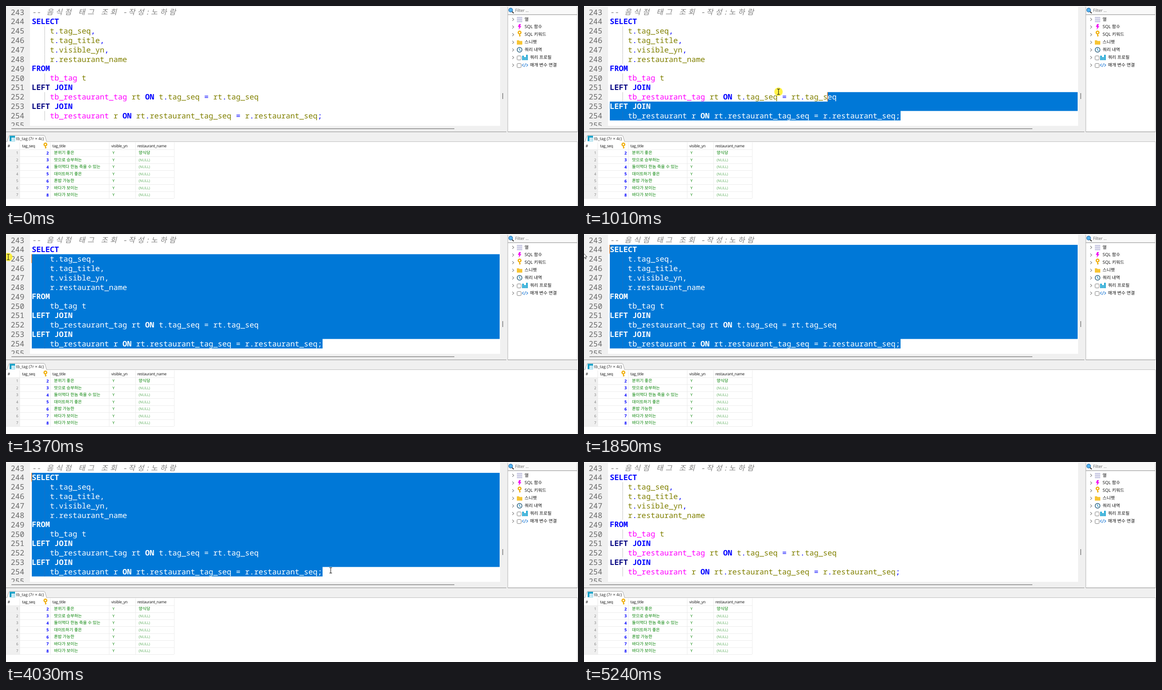
Animation of 1263 by 443 pixels, one loop 5.3 s. Source, as an HTML page:

```html
<!DOCTYPE html>
<html lang="ko">
<head>
<meta charset="utf-8">
<style>
html, body { margin: 0; width: 100%; height: 100%; overflow: hidden; background: #f0f0f0; }
svg { display: block; width: 1263px; height: 443px; }
text { white-space: pre; text-rendering: geometricPrecision; font-family: "Open Sans", "Noto Sans CJK KR", sans-serif; }
.code text { font: 16.7px "Noto Sans Mono", "Noto Sans CJK KR", monospace; fill: #808000; }
.code .num { fill: #6a6a6a; }
.code .note { font-size: 16px; font-style: italic; fill: #808080; }
.kw { font-weight: bold; fill: #00f; }
.fn { font-weight: bold; fill: #000080; }
.tb { fill: #f0f; }
.op { fill: #00f; }
#sel text, #sel tspan { fill: #fff; }
.side { font-size: 9.8px; fill: #111; }
.head { font-size: 8.6px; letter-spacing: -.28px; fill: #111; }
.cell { font-size: 9.2px; fill: #008000; }
.null { font-size: 8px; fill: #5cad5c; }
.idx { font-size: 8px; fill: #777; text-anchor: end; }
.key { font-size: 9px; font-weight: bold; fill: #00f; text-anchor: end; }
</style>
</head>
<body>
<svg id="stage" viewBox="0 0 1263 443"></svg>
<script>
const LOOP = 5300, LEFT = 57, CELL = 10.02, TOP = 3.1, ROW = 20.86, END = 699;
const lines = [
  '-- 음식점 태그 조회 -작성:노하람', 'SELECT', '    t.tag_seq,', '    t.tag_title,',
  '    t.visible_yn,', '    r.restaurant_name', 'FROM ', '    tb_tag t', 'LEFT JOIN',
  '    tb_restaurant_tag rt ON t.tag_seq = rt.tag_seq', 'LEFT JOIN',
  '    tb_restaurant r ON rt.restaurant_tag_seq = r.restaurant_seq;'
];
const LAST = lines.length - 1;
const rowTop = i => TOP + i * ROW;

const rect = (x, y, w, h, fill, more = '') => `<rect x="${x}" y="${y}" width="${w}" height="${h}" fill="${fill}" ${more}/>`;
const path = (d, stroke, width = 1, fill = 'none') => `<path d="${d}" stroke="${stroke}" stroke-width="${width}" fill="${fill}"/>`;
const text = (x, y, s, cls) => `<text x="${x}" y="${y}" class="${cls}">${s}</text>`;

function paint(word) {
  const cls = /^(SELECT|FROM|JOIN|ON)$/.test(word) ? 'kw' : word === 'LEFT' ? 'fn'
    : word.startsWith('tb_') ? 'tb' : /\W/.test(word) ? 'op' : '';
  return cls ? `<tspan class="${cls}">${word}</tspan>` : word;
}

// Hangul takes two cells
function comment(s) {
  let x = LEFT;
  const xs = [...s].map(c => {
    const wide = c > '\u0fff', at = x + (wide ? 2.5 : 0);
    x += CELL * (wide ? 2 : 1);
    return at.toFixed(1);
  });
  return text(xs.join(' '), rowTop(0) + 15.4, s, 'note');
}

function codeText() {
  return comment(lines[0]) + lines.slice(1).map((line, i) => {
    const body = line.trim(), indent = line.startsWith(' ') ? 4 : 0;
    return text(LEFT + indent * CELL, rowTop(i + 1) + 16.2, body.replace(/\w+|[.,;=]/g, paint), '');
  }).join('');
}

function guides(color) {
  return lines.map((line, i) => line.startsWith(' ') ? rect(85, rowTop(i), 1, ROW, color) : '').join('');
}

function goldKey(x, y) {
  return `<circle cx="${x}" cy="${y - 2.2}" r="3" fill="none" stroke="#f0b010" stroke-width="2.6"/>`
    + path(`M${x} ${y + 1}V${y + 6.5}M${x} ${y + 4.8}h2.6`, '#f0b010', 2);
}

function editor() {
  const nums = lines.concat('').map((_, i) => text(10.5, rowTop(i) + 16.4, 243 + i, 'num')).join('');
  return rect(0, 0, 1105, 2, '#f8f8f8') + rect(53, 2, 1038, 263.5, '#fff')
    + `<g class="code" clip-path="url(#pane)">${nums}${guides('#c6c6c6')}${codeText()}
       <g id="sel" clip-path="url(#picked)">${rect(0, 0, 1100, 270, '#0078d7')}${guides('#1a70c4')}${codeText()}</g></g>`
    + rect(12, 271, 978, 1.5, '#858585', 'id="thumb"')
    + `<g id="arrows">${path('M7 269v6l-4-3zM1081 269v6l5-3z', 'none', 0, '#858585')}</g>`
    + rect(1096, 193, 1.5, 13, '#777') + rect(0, 278, 1105, 1.3, '#a0a0a0');
}

function sidebar() {
  const labels = ['열', 'SQL 함수', 'SQL 키워드', '스니펫', '쿼리 내역', '쿼리 프로필', '매개 변수 연결'];
  const list = labels.map((s, i) => {
    const y = 29.5 + i * 16.9, boxed = i > 4;
    return path(`M1118 ${y - 3}l3.2 3.2l-3.2 3.2`, '#777', 1.1)
      + text(boxed ? 1157 : 1145, y + 3, s, 'side')
      + (boxed ? rect(1128.5, y - 3.5, 9, 9, '#fff', 'rx="2" stroke="#777"') : '');
  }).join('');
  return rect(1105, 0, 158, 443, '#f0f0f0') + rect(1108, 1, 153, 18, '#f9f9f9')
    + rect(1108, 20, 153, 258, '#fff') + rect(1108, 18.6, 153, 1.2, '#999')
    + rect(1107.5, 2, 1, 277, '#b0b0b0') + rect(1261, 2, 1, 277, '#c4c4c4') + rect(1108, 278, 154, 1.3, '#a0a0a0')
    + path('M1117 12l4 4', '#333', 2)
    + '<circle cx="1114.3" cy="9" r="4.3" fill="#55b4f0" stroke="#2a6fae" stroke-width="1.2"/>'
    + `<text x="1124" y="13" font-size="9.3" letter-spacing="-.15" fill="#666">Filter ...</text>` + list
    + [24, 28.3, 32.6].map(y => rect(1128, y, 12, 3.5, '#cfcfe6')).join('')
    + path('M1133 40h4l-2 4.5h3l-6 8l1.2-6h-3z', 'none', 0, '#f010f0') + goldKey(1134, 61)
    + path('M1128 76h4.5l1.5 1.5h6v8h-12z', 'none', 0, '#f7c433')
    + '<circle cx="1134" cy="97" r="5.3" fill="#fff" stroke="#245a78" stroke-width="1.5"/>'
    + path('M1134 93.5v4l2.5 1.5', '#1a94d0', 1.4)
    + path('M1141.6 110v10M1145.9 113v7M1150.2 108v12', '#10a0d0', 3.2)
    + path('M1143 128l-3 3l3 3M1149 128l3 3l-3 3M1147.3 127l-2.6 8', '#2a80d8', 1.2);
}

function results() {
  const tags = ['분위기 좋은', '맛으로 승부하는', '둘이먹다 한놈 죽을 수 있는', '데이트하기 좋은', '혼밥 가능한', '바다가 보이는', '바다가 보이는'];
  const rows = tags.map((tag, i) => {
    const y = 328.3 + i * 15.5;
    return text(27, y, i + 1, 'idx') + text(94.5, y + .2, i + 2, 'key') + text(106, y, tag, 'cell')
      + `<text x="235" y="${y}" fill="#008000" font-size="8.4">Y</text>`
      + (i ? text(293, y, '(NULL)', 'null') : text(293, y, '양식당', 'cell'))
      + rect(0, 333 + i * 15.5, 371, 1, '#ebebeb');
  }).join('');
  return rect(0, 301, 1261, 142, '#fff') + rect(0, 300, 1262, 1, '#bcbcbc') + rect(1261, 300, 1, 143, '#ccc')
    + path('M2 301L6.5 288Q7 286.5 9 286.5H83Q85 286.5 85.8 288L90 301', '#a8a8a8', 1, '#fff')
    + rect(8, 287.5, 12, 12, '#129fc6') + rect(12, 291.5, 7.5, 7.5, '#e3f5fb')
    + path('M12 295h8M15.7 291v8', '#8fcfe2', .8)
    + `<text x="22" y="297" font-size="9" fill="#222">tb_tag (7r × 4c)</text>`
    + rect(0, 318, 30, 108, '#f0f0f0') + rect(0, 317.6, 371, 1, '#ebebeb')
    + [30, 97.5, 227.5, 285.5, 371].map(x => rect(x, 302, 1, 124, '#ebebeb')).join('')
    + [[3.5, '#'], [35.5, 'tag_seq'], [102.5, 'tag_title'], [232.5, 'visible_yn'], [290, 'restaurant_name']]
      .map(([x, s]) => text(x, 312.8, s, 'head')).join('')
    + goldKey(87, 309) + rows;
}

const $ = id => document.getElementById(id);
$('stage').innerHTML = `<defs><clipPath id="pane">${rect(0, 2, 1091, 263.5, '#000')}</clipPath>
  <clipPath id="picked"><path id="area"/></clipPath></defs>
  ${rect(0, 0, 1263, 443, '#f0f0f0')}${editor()}${sidebar()}${results()}
  ${rect(0, 0, 1.4, 19.5, '#000', 'id="caret"')}
  <g id="mouse"><circle id="press" r="9.3" fill="#ffee00" opacity=".72"/>
  <g id="beam">${path('M-3 -6H-.8L0 -5.3L.8 -6H3M0 -5.3V5.3M-3 6H-.8L0 5.3L.8 6H3', '#111', 1.1)}</g>
  <g id="arrow">${path('M-4 0V11.5L-1.3 9L.5 12.8L2.2 12L.5 8.3H4.2Z', '#222', .9, '#fff')}</g></g>`;

// Pointer track: time, x, y
const track = [
  [200, 842, 376], [405, 800, 330], [600, 752, 262], [670, 738, 242], [740, 738, 240], [870, 738, 240],
  [938, 630, 230], [1005, 430, 190], [1072, 250, 152], [1139, 132, 126], [1206, 55, 89], [1273, 25, 66],
  [1341, 5, 51], [1500, 4, 50], [1640, 4, 38], [1790, 4, 38], [1850, 0, 51], [3470, 0, 51], [3600, 125, 140],
  [3755, 347, 212], [3960, 700, 234], [4020, 717, 240], [4240, 717, 240], [4630, 1216, 418], [4700, 1236, 431]
];
const clamp = (v, lo, hi) => Math.min(hi, Math.max(lo, v));
const within = (t, ...spans) => spans.some(([a, b]) => t >= a && t < b);
const show = (id, on) => $(id).setAttribute('visibility', on ? 'inherit' : 'hidden');

function pointer(t) {
  const n = track.findIndex(k => k[0] > t);
  if (n < 1) return (n ? track[track.length - 1] : track[0]).slice(1);
  const [t0, x0, y0] = track[n - 1], [t1, x1, y1] = track[n], p = (t - t0) / (t1 - t0);
  return [x0 + (x1 - x0) * p, y0 + (y1 - y0) * p];
}

function caretCell(t) {
  if (t >= 1640) return [1, 0];
  const [x, y] = pointer(t - 35);  // the selection trails the pointer
  const row = clamp(Math.floor((y - TOP) / ROW), 1, LAST);
  return [row, clamp(Math.round((x - LEFT) / CELL), 0, lines[row].length)];
}

function areaPath(row, x) {
  const y = rowTop(row), next = y + ROW, last = rowTop(LAST), end = last + ROW;
  if (row === LAST) return `M${x} ${y}H${END}V${end}H${x}Z`;
  return `M${x} ${y}H1090V${last}H${END}V${end}H${LEFT}V${next}H${x}Z`;
}

function draw(t) {
  const step = t < 200 ? t : 200 + Math.floor((t - 200) / 67.1) * 67.1;
  const [x, y] = pointer(step);
  const selecting = within(t, [875, 4170]);
  const [row, col] = selecting ? caretCell(step) : [LAST, 60 + 4];
  const caretX = LEFT + col * CELL;

  $('area').setAttribute('d', selecting ? areaPath(row, caretX) : '');
  $('caret').setAttribute('x', caretX - 1);
  $('caret').setAttribute('y', rowTop(row));
  $('caret').setAttribute('fill', selecting ? '#ff8728' : '#000');
  show('caret', within(t, [740, 2190], [2710, 3510], [4030, 5240]));

  const hover = within(t, [540, 880]);
  $('thumb').setAttribute('y', hover ? 269.5 : 271);
  $('thumb').setAttribute('height', hover ? 4.5 : 1.5);
  $('thumb').setAttribute('rx', hover ? 2 : 0);
  show('arrows', hover);

  const arrow = !within(t, [740, 1850]) && (x < 53 || x > 1091 || y > 266);
  $('mouse').setAttribute('transform', `translate(${x} ${y})`);
  show('mouse', within(t, [200, 4770]));
  show('press', within(t, [740, 1850], [4170, 4300]));
  show('beam', !arrow);
  show('arrow', arrow);
}

const start = performance.now();
(function tick() {
  draw((performance.now() - start) % LOOP);
  requestAnimationFrame(tick);
})();
</script>
</body>
</html>
```
